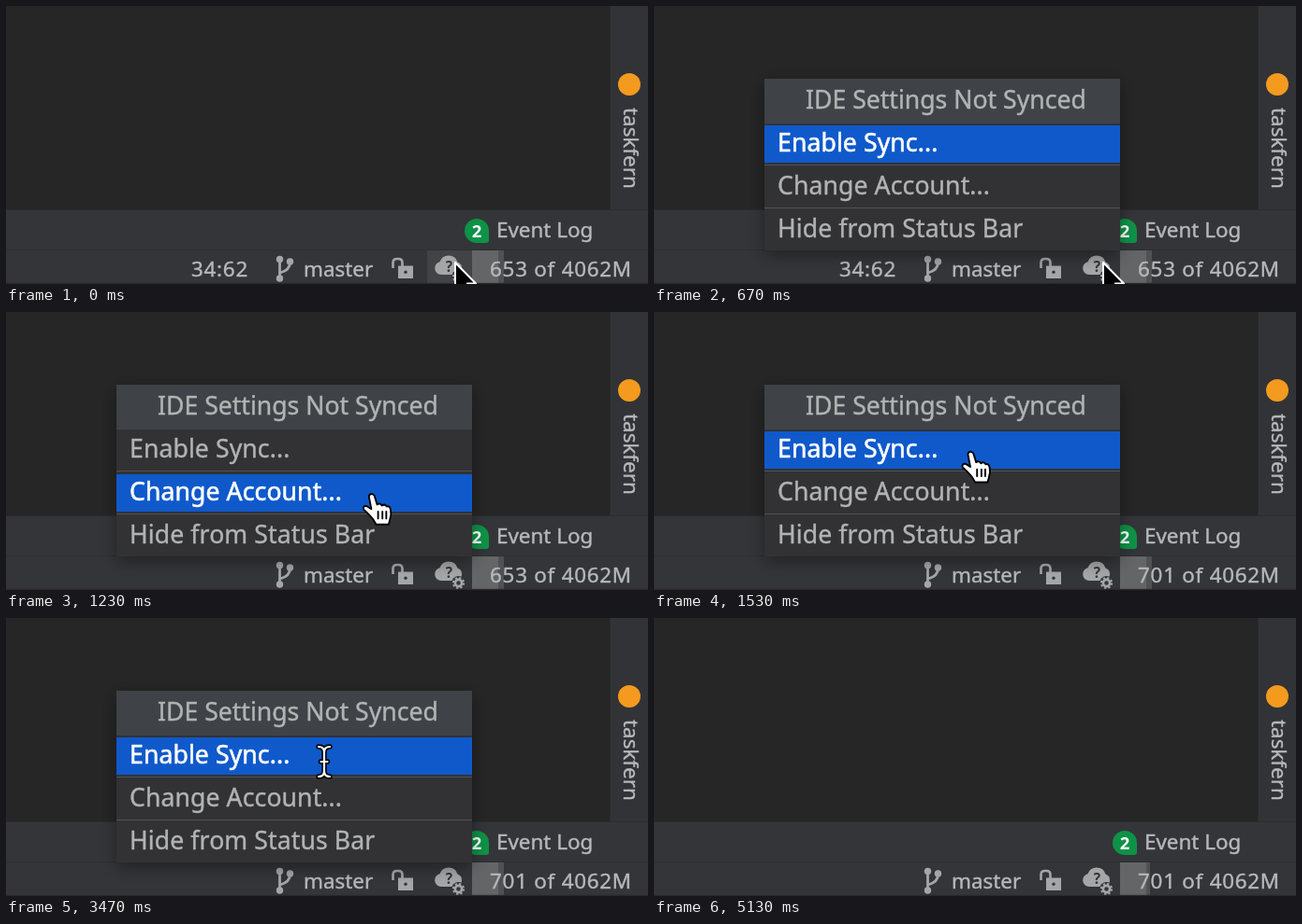
These frames come from a looping animation (686x298 px, 5.63 s). An HTML page:

```html
<!DOCTYPE html>
<html lang="en">
<head>
<meta charset="utf-8">
<title>Settings sync menu</title>
<style>
  html, body { margin: 0; width: 100%; height: 100%; overflow: hidden; background: #262626; }
  svg { display: block; width: 100%; height: 100%; }
  text { font: 22.4px "Noto Sans", "Open Sans", sans-serif; fill: #b7b8ba; stroke: #b7b8ba; stroke-width: .4; white-space: pre; }
  .number { letter-spacing: .75px; }
  .badge { font-size: 18.5px; font-weight: 700; fill: #fff; stroke: none; }
  #question { font-size: 15.5px; font-weight: 700; fill: #343539; stroke: none; }
  #menu text { font-size: 26.6px; fill: #b2b3b4; stroke: #b2b3b4; }
  #menu .item { letter-spacing: .1px; }
  #menu .active { fill: #fff; stroke: #fff; stroke-width: .6; }
  .icon { fill: #a5a6a8; }
  .line { fill: none; stroke: #a5a6a8; }
</style>
</head>
<body>
<svg viewBox="0 0 686 298" preserveAspectRatio="none">
  <defs>
    <filter id="shadow" x="-15%" y="-20%" width="130%" height="150%">
      <feDropShadow dx="0" dy="5" stdDeviation="9" flood-color="#000" flood-opacity=".38"/>
    </filter>
    <path id="beam" d="M-6-16Q0-16 0-10V10Q0 16-6 16M6-16Q0-16 0-10M0 10Q0 16 6 16M-3.5 0H3.5"/>
  </defs>

  <!-- Editor, side strip and bottom bars -->
  <rect width="686" height="298" fill="#262626"/>
  <rect x="645" width="41" height="218" fill="#323337"/>
  <rect x="645" width="1" height="218" fill="#2a2b2d"/>
  <rect y="218" width="686" height="80" fill="#343539"/>
  <rect y="218" width="686" height="1" fill="#2b2c2e"/>
  <rect y="261" width="686" height="1" fill="#2d2e31"/>
  <circle cx="666" cy="84" r="12" fill="#f39a1f"/>
  <text transform="translate(660 109) rotate(90)">taskfern</text>

  <path d="M503 228A13 13 0 0 1 516 241V251Q516 254 513 254H503A13 13 0 0 1 503 228" fill="#0e9247"/>
  <text class="badge" x="503" y="247.5" text-anchor="middle">2</text>
  <text x="524" y="247.5">Event Log</text>

  <!-- Status bar -->
  <text id="position" class="number" x="198" y="289.5">34:62</text>
  <path class="line" stroke-width="2.8" d="M292.5 273V291M303.5 275Q303.5 283 293 286"/>
  <g class="icon">
    <circle cx="292.5" cy="271.5" r="3.7"/>
    <circle cx="303.5" cy="274" r="3.7"/>
    <circle cx="292.5" cy="292" r="3.7"/>
  </g>
  <text x="318" y="289.5">master</text>
  <path class="line" stroke-width="2.6" d="M413.5 281V275Q413.5 271 418 271H419Q423.500 271 423.500 275V280"/>
  <rect class="icon" x="419" y="278.500" width="16" height="13.500"/>
  <circle cx="427" cy="285.200" r="1.700" fill="#343539"/>

  <rect id="hover" x="450" y="262" width="48" height="36" fill="#414347"/>
  <path id="cloud" d="M465 288A7 7 0 0 1 463.5 274.2A10 10 0 0 1 482.5 274.5A7 7 0 0 1 481 288Z"/>
  <text id="question" x="473.5" y="284.5" text-anchor="middle">?</text>
  <path id="arrow-left" d="M465 279.5L472 273V277.5H481V281.5H472V286Z" fill="#343539"/>
  <g transform="translate(483.5 290.5)">
    <circle r="7.5" fill="#343539"/>
    <circle class="line" r="3.6" stroke-width="2.6"/>
    <circle class="line" r="5.6" stroke-width="2" stroke-dasharray="2.2 2.2"/>
  </g>

  <rect id="allocated" x="498" y="262" height="36" fill="#505153"/>
  <rect x="498" y="262" width="28" height="36" fill="#646567"/>
  <text id="memory" class="number" x="593" y="289.5" text-anchor="middle"></text>
  <rect y="296.8" width="686" height="1.2" fill="#30262e"/>

  <!-- Popup menu -->
  <g id="menu">
    <rect x="118" y="78" width="380" height="184" fill="#323336" filter="url(#shadow)"/>
    <rect x="118" y="78" width="380" height="48" fill="#3f4347"/>
    <path d="M118 170.5H498M118 216.5H498" stroke="#505254"/>
    <rect id="highlight" x="118" width="380" height="40" fill="#0f59cb"/>
    <text x="162" y="110">IDE Settings Not Synced</text>
    <text class="item" x="132" y="156">Enable Sync...</text>
    <text class="item" x="132" y="202">Change Account...</text>
    <text class="item" x="132" y="248">Hide from Status Bar</text>
  </g>

  <!-- Pointer shapes share one hot spot at 0,0 -->
  <g id="pointer" stroke-linejoin="round" stroke-linecap="round">
    <path id="arrow" d="M0 0V31L7 24.5L12 36L18 33.5L13 22.5H22Z" fill="#000" stroke="#fff" stroke-width="2"/>
    <g id="hand" transform="translate(-2 -2.5) scale(1.03 1.07)" stroke="#000" stroke-width="1.8">
      <path fill="#fff" d="M-2.5 1Q-2-2 1-1.5Q3-1 3.5 1L6 9Q9 7 11 10Q14 8 16 11Q19 10 20 14
        Q21 19 19.5 23L18 29H5L2 24Q-4 17-8 14Q-9 10-5 10.5L0 13.5Z"/>
      <path fill="none" d="M7 16V23M11.5 16V23M15.5 16V23"/>
    </g>
    <g id="ibeam" fill="none">
      <use href="#beam" stroke="#000" stroke-width="5.4"/>
      <use href="#beam" stroke="#fff" stroke-width="2.2"/>
    </g>
  </g>
</svg>
<script>
  const LOOP = 5630;
  const MENU_OPEN = 500, MENU_CLOSE = 3500;
  const SYNC_START = 3570, SYNC_END = 4730;
  const el = id => document.getElementById(id);
  const show = (id, on) => el(id).setAttribute("display", on ? "inline" : "none");
  const items = document.querySelectorAll(".item");
  const smooth = p => p * p * (3 - 2 * p);

  // Each move: start time, end time, destination, easing
  const HOME = [480, 275];
  const moves = [
    [810, 1530, [340, 154], smooth],
    [3740, 3830, [303, 86], smooth],
    [4000, 4270, [143, -26], p => p ** 1.4]
  ];

  function pointerAt(t) {
    let at = HOME;
    for (const [start, end, to, ease] of moves) {
      const p = ease(Math.min(1, Math.max(0, (t - start) / (end - start))));
      at = at.map((v, i) => v + (to[i] - v) * p);
    }
    return at;
  }

  function draw(t) {
    const [x, y] = pointerAt(t);
    const menuOpen = t >= MENU_OPEN && t < MENU_CLOSE;
    const overMenu = menuOpen && y < 262;
    const syncing = t >= SYNC_START && t < SYNC_END;

    const row = !overMenu || y < 170 ? 0 : y < 217 ? 1 : 2;
    show("menu", menuOpen);
    el("highlight").setAttribute("y", 128 + 46 * row);
    items.forEach((item, i) => item.classList.toggle("active", i === row));

    show("position", t < 830);
    show("hover", t < MENU_OPEN);
    el("cloud").setAttribute("fill", syncing ? "#2390cd" : "#a5a6a8");
    show("question", !syncing);
    show("arrow-left", syncing);
    el("memory").textContent = (t < 1270 ? 653 : 701) + " of 4062M";
    el("allocated").setAttribute("width", t < 3770 ? 34 : 32);

    el("pointer").setAttribute("transform", `translate(${x} ${y})`);
    show("arrow", t < MENU_CLOSE && !overMenu);
    show("hand", overMenu && t < 3440);
    show("ibeam", t >= 3440);
  }

  const began = performance.now();
  function tick() {
    draw((performance.now() - began) % LOOP);
    requestAnimationFrame(tick);
  }
  tick();
</script>
</body>
</html>
```
